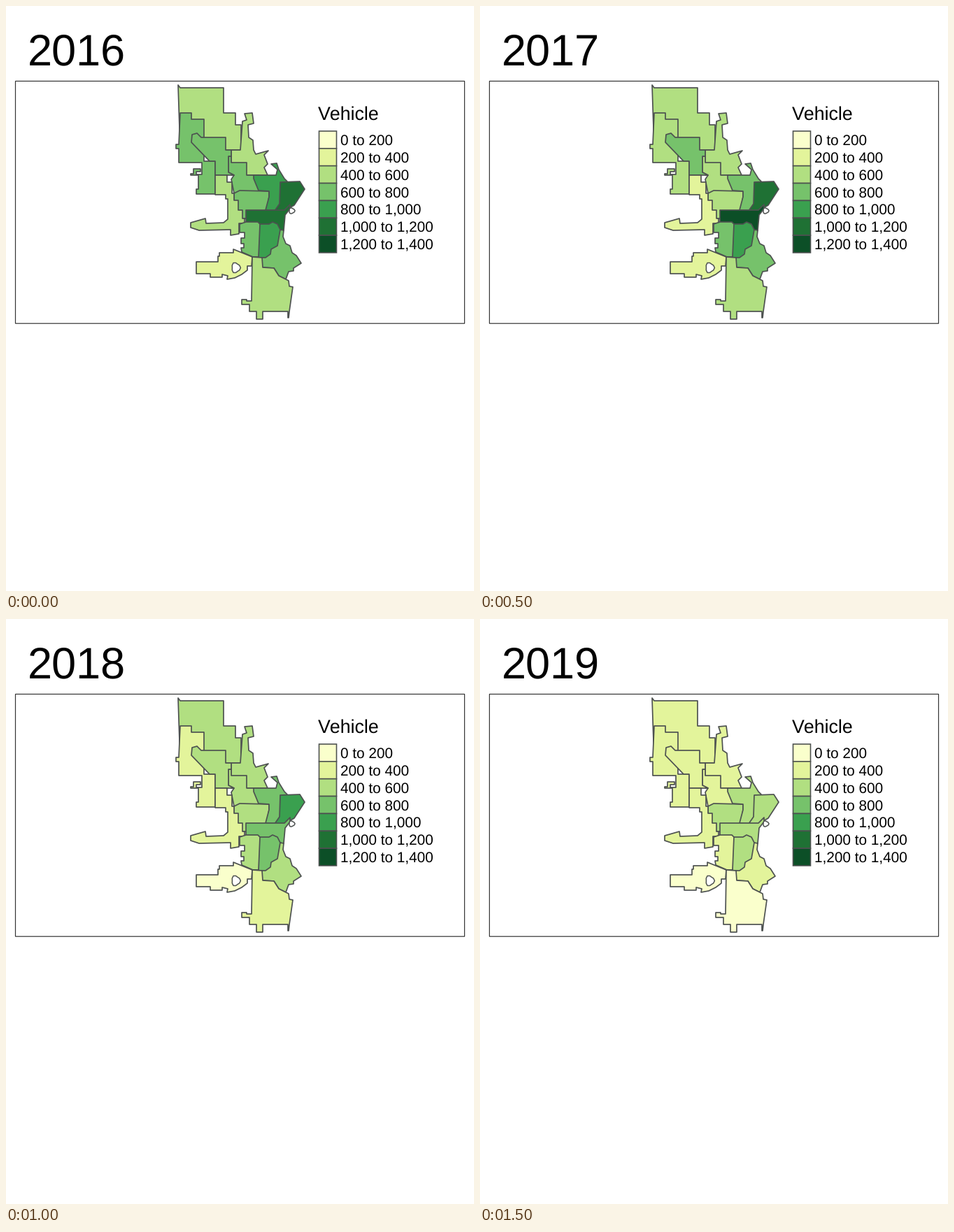
A matplotlib script for the animation above (2 s loop, 669x837 px).

```python
import matplotlib.pyplot as plt
import numpy as np
from matplotlib.animation import FuncAnimation
from matplotlib.patches import Polygon, Rectangle

W, H, DPI = 669, 837, 64
PX = 72 / DPI  # points per pixel
YEARS = range(2016, 2020)
SHADES = ["#faffcc", "#e3f49b", "#b1df81", "#76c26b", "#3aa04f", "#1f7134", "#0c4f27"]
EDGE = "#4d5150"
ROW, STEP = 24.85, 200

plt.rcParams["font.family"] = "Liberation Sans"
plt.rcParams["text.hinting"] = "no_hinting"
plt.rcParams["text.kerning_factor"] = 6  # in effect, no kerning

fig = plt.figure(figsize=(W / DPI, H / DPI), dpi=DPI, facecolor="white")
ax = fig.add_axes([0, 0, 1, 1])
ax.set_xlim(0, W)
ax.set_ylim(H, 0)
ax.axis("off")

districts = []


def path(*coords):
    """Points joined by straight lines: x, y, x, y, ..."""
    return np.reshape(coords, (-1, 2))


def stair(x, y, *stops):
    """Right-angled path; stops are the next x, the next y and so on."""
    points = [(x, y)]
    for i, stop in enumerate(stops):
        x, y = (x, stop) if i % 2 else (stop, y)
        points.append((x, y))
    return points


def ring(x, y, rx, ry, lobes=3, wobble=0.15):
    """Small closed loop with a wavy rim."""
    a = np.linspace(0, 2 * np.pi, 12, endpoint=False)
    r = 1 + wobble * np.cos(lobes * a)
    return np.column_stack([x + rx * r * np.cos(a), y + ry * r * np.sin(a)])


def shape(*parts, width=1.7):
    patch = Polygon(np.vstack(parts), facecolor="white", edgecolor=EDGE,
                    linewidth=width * PX, joinstyle="round", snap=False)
    return ax.add_patch(patch)


def district(levels, *parts):
    """Add a district with one shade level per year."""
    districts.append((shape(*parts), levels))


def box(x, y, w, h, fill, edge, width):
    ax.add_patch(Rectangle((x, y), w, h, facecolor=fill, edgecolor=edge,
                           linewidth=width * PX, snap=False))


def text(x, y, label, size):
    return ax.text(x, y, label, fontsize=size * PX, color="black",
                   ha="left", va="baseline")


box(13.5, 107.5, 642, 346.7, "none", "#333333", 1.2)

# Each district overlaps the ones before it, so a shared border is given once.
# North
district((2, 2, 2, 1), path(246, 113),
         stair(249, 117, 311, 153, 328, 170, 336, 206, 249))
district((2, 2, 2, 1),
         path(335, 206, 338, 165, 344, 163, 341, 154, 352, 153, 354, 168, 346, 170,
              347, 188, 353, 192, 354, 206, 357, 212, 375, 207, 369, 213, 374, 226,
              369, 231, 374, 242),
         stair(322, 242, 322, 206))

# West and middle
district((3, 2, 1, 1),
         stair(249, 153, 265, 162, 283, 222, 299, 269, 272, 262, 275, 242, 264, 240,
               268, 233, 278, 237, 272, 241, 280, 224, 247, 204, 243, 198, 247))
district((3, 2, 2, 1), stair(318, 215, 322, 224, 344, 242, 361, 268, 326),
         path(322, 248, 326, 242, 318, 238))
district((3, 3, 2, 1), path(265, 195, 266, 184, 273, 182),
         stair(279, 188, 314, 206, 322, 215, 318, 238),
         path(326, 242, 299, 242, 299, 222, 291, 222))
district((3, 2, 2, 2),
         path(326, 268, 334, 264, 376, 265, 376, 273, 371, 304, 326, 304))
district((2, 1, 1, 1),
         stair(299, 242, 316, 252, 323, 268, 326, 278, 332, 292, 338, 304, 341, 311,
               333, 326),
         path(321, 328, 321, 320, 276, 321, 264, 317, 264, 310, 285, 304, 286, 311,
              311, 310, 317, 305),
         stair(317, 276, 314, 270, 299))

# East
district((4, 3, 3, 2),
         path(354, 242, 386, 242, 388, 234, 379, 226, 387, 225, 390, 234, 398, 247,
              402, 251, 392, 293, 371, 292, 376, 273, 376, 265, 361, 264, 354, 247))
district((5, 5, 4, 2),
         path(392, 252, 420, 251, 427, 262, 412, 285, 398, 293, 384, 293, 391, 283))
district((5, 6, 3, 2),
         path(343, 292, 398, 292, 406, 284, 406, 290, 399, 299, 397, 321, 343, 321))
shape(ring(408.5, 293, 4, 4), width=1.5)

# South
district((3, 3, 2, 1),
         path(392, 320, 397, 321, 396, 330, 400, 340, 406, 343, 409, 353, 415, 357,
              422, 368, 411, 375, 411, 379, 404, 380, 400, 391, 390, 386, 383, 375,
              366, 374, 366, 350))
district((4, 4, 3, 2),
         path(361, 360, 361, 312, 376, 312, 381, 309, 388, 312, 392, 320, 388, 343,
              379, 348, 378, 355, 371, 360))
district((3, 3, 2, 1),
         path(334, 312, 343, 309, 360, 309, 363, 312, 361, 359, 353, 359, 337, 352),
         stair(336, 346, 340, 340, 336, 332, 341, 324, 334))
district((1, 1, 0, 0), stair(272, 366, 303, 358, 305, 353, 325, 348),
         path(352, 359, 351, 372),
         stair(345, 372, 345, 378),
         path(337, 384, 327, 389, 316, 391, 317, 386),
         stair(309, 384, 309, 388, 292, 383, 272))
shape(ring(328.5, 374.5, 6, 7), width=1.5)
district((2, 2, 1, 0),
         path(352, 359, 366, 360, 367, 374, 383, 375, 390, 386, 404, 393, 405, 401,
              410, 402, 405, 437),
         stair(404, 446, 403, 437, 367, 448, 358, 437, 348, 427, 337, 420, 344, 422,
               351))

# Legend
text(445.5, 163, "Vehicle", 26.8)
for i, shade in enumerate(SHADES):
    top = 179 + i * ROW
    box(447.5, top, 25, ROW, shade, EDGE, 1.6)
    text(478, top + 20.2, f"{i * STEP:,} to {(i + 1) * STEP:,}", 20.7)

title = text(31, 85, "", 63)


def update(i):
    title.set_text(str(YEARS[i]))
    for patch, levels in districts:
        patch.set_facecolor(SHADES[levels[i]])
    return [title] + [patch for patch, _ in districts]


anim = FuncAnimation(fig, update, frames=len(YEARS), interval=500,
                     repeat=True, repeat_delay=0, blit=False)
plt.show()
```
